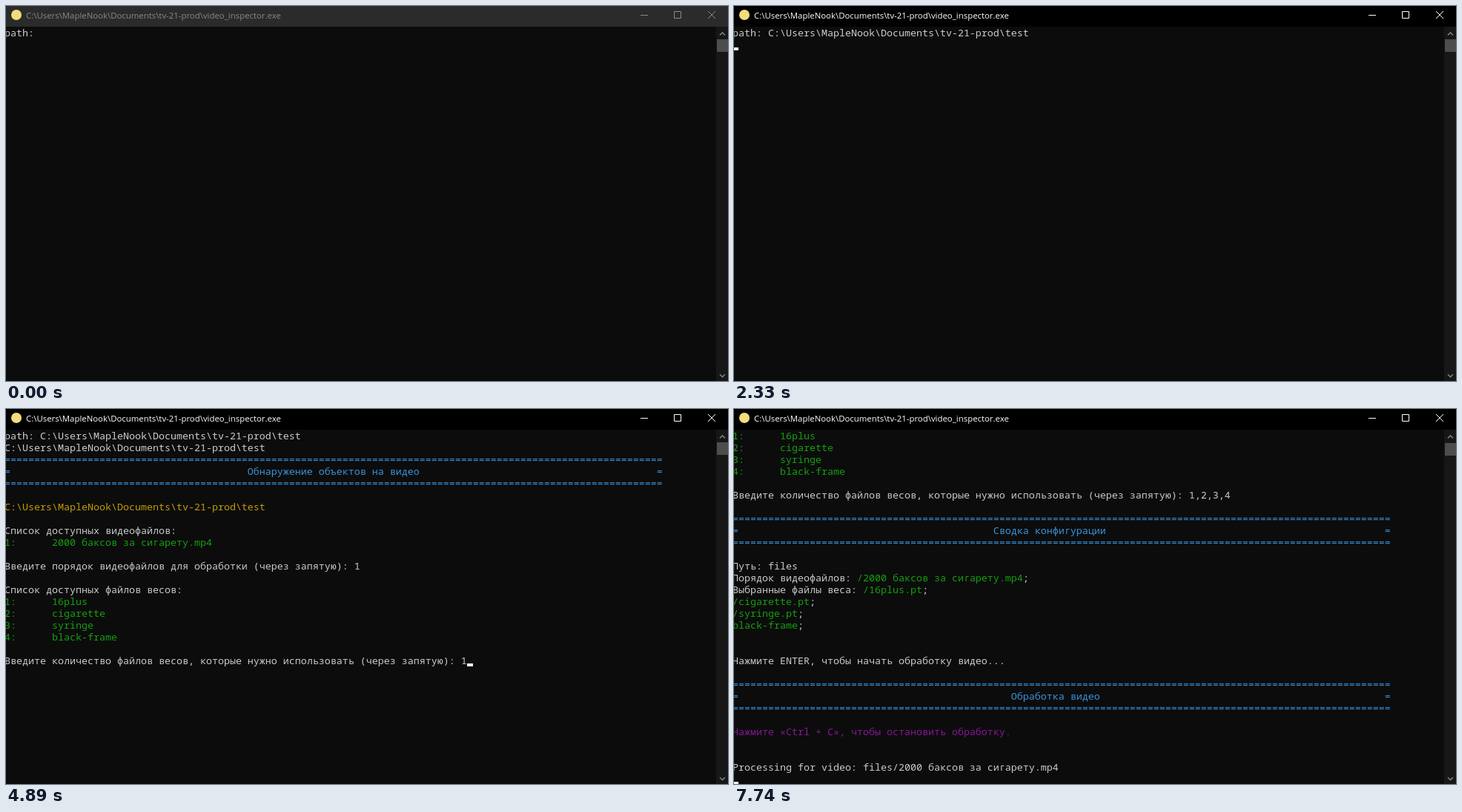
An HTML page that plays this animation: 974 px wide and 507 px high, repeating every 8000 ms.

```html
<!DOCTYPE html>
<html lang="ru">
<head>
<meta charset="utf-8">
<title>video_inspector</title>
<style>
  html, body { margin: 0; width: 974px; height: 507px; overflow: hidden; background: #0c0c0c; }
  body { position: relative; }
  #bar { position: absolute; inset: 0 0 auto; height: 28px; background: #2b2b2b; color: #8a8a8a; }
  #bar.active { background: #000; color: #fff; }
  #bar span { position: absolute; left: 27px; font: 11.4px/25px "Open Sans", sans-serif; white-space: pre; }
  #bar i { position: absolute; left: 7px; top: 5px; width: 14px; height: 14px; border-radius: 50%; background: #f3dc7c; }
  svg { position: absolute; left: 0; top: 0; }
  #screen { position: absolute; left: 0; top: 28px; width: 958px; height: 479px; overflow: hidden; }
  pre { position: absolute; left: -2px; top: 0; margin: 0; color: #ccc;
        font: 500 13.333px/16px "Noto Sans Mono", monospace; font-variant-ligatures: none; }
  #caret { position: absolute; width: 8px; height: 4px; background: #f2f2f2; }
  .b { color: #3a96dd } .y { color: #c19c00 } .g { color: #13a10e } .m { color: #881798 }
  #track { position: absolute; left: 958px; top: 28px; width: 16px; height: 479px; background: #171717; }
  #thumb { position: absolute; left: 1px; top: 17px; width: 15px; height: 17px; background: #4d4d4d; }
</style>
</head>
<body>
<div id="screen"><pre id="log"></pre><div id="caret"></div></div>
<div id="track">
  <div id="thumb"></div>
  <svg width="16" height="479" fill="none" stroke="#71827f" stroke-width="1.6">
    <path d="M5 11.5l3.5-3.5l3.5 3.5M5 470l3.5 3.5l3.5-3.5"/>
  </svg>
</div>
<div id="bar">
  <i></i><span id="title"></span>
  <svg width="974" height="28" fill="none" stroke="currentColor">
    <path d="M856 12.5h10M901.5 7.5h9v9h-9z"/><path d="M947 7l10 10M957 7l-10 10"/>
  </svg>
</div>
<svg id="mouse" width="14" height="20"><path fill="#fff" d="M0 0V15.5L3.4 12.4L5.8 17.5L7.9 16.6L5.6 11.6H10.4Z"/></svg>

<script>
const LOOP = 8000, ROWS = 30, CELL = 8, LINE = 16;
const $ = id => document.getElementById(id);
const paint = c => s => `<span class="${c}">${s}</span>`;
const blue = paint('b'), yellow = paint('y'), green = paint('g'), magenta = paint('m');

const root = 'C:\\Users\\MapleNook\\Documents\\tv-21-prod\\';
const dir = root + 'test';
const clip = '2000 баксов за сигарету.mp4';
const weights = ['16plus', 'cigarette', 'syringe', 'black-frame'];

const rule = '='.repeat(111);
const banner = (text, col) =>
  blue([rule, ('='.padEnd(col) + text).padEnd(110) + '=', rule].join('\n'));
const list = items => items.map((s, i) => green(`${i + 1}:      ${s}`)).join('\n');

// Console output: [time, appended text]
const output = [
  [0, 'path: '],
  [1390, dir],
  [2330, '\n'],
  [3240, [dir, banner('Обнаружение объектов на видео', 41), '', yellow(dir), '',
    'Список доступных видеофайлов:', list([clip]), '',
    'Введите порядок видеофайлов для обработки (через запятую): '].join('\n')],
  [4290, '1'],
  [4360, ['', '', 'Список доступных файлов весов:', list(weights), '',
    'Введите количество файлов весов, которые нужно использовать (через запятую): '].join('\n')],
  [4890, '1'], [5520, ','], [5870, '2'],
  [6010, ','], [6093, '3'], [6177, ','], [6260, '4'],
  [6720, ['', '', banner('Сводка конфигурации', 44), '', 'Путь: files',
    `Порядок видеофайлов: ${green('/' + clip)};`,
    `Выбранные файлы веса: ${green('/16plus.pt')};`,
    green('/cigarette.pt') + ';', green('/syringe.pt') + ';', green('black-frame') + ';',
    '', '', 'Нажмите ENTER, чтобы начать обработку видео...', ''].join('\n')],
  [7740, ['', banner('Обработка видео', 47), '',
    magenta('Нажмите «Ctrl + C», чтобы остановить обработку.'), '', '',
    'Processing for video: files/' + clip, ''].join('\n')],
];

const exitPath = [[222, 104], [291, 129], [381, 118], [470, 82], [547, 43]];
function pointer(t) {
  if (t < 350 || t >= 1800) return null;
  if (t >= 1600) return exitPath[Math.min(4, Math.floor((t - 1600) / 40))];
  const p = Math.min(1, Math.floor((t - 350) / 42.3) / 13);
  const left = (1 - p) ** 2;
  return [179 + 308 * left + 108 * left * left, 70 + 384 * left];
}

let shown = 0;
function drawLog(count) {
  if (count === shown) return;
  shown = count;
  $('log').innerHTML = output.slice(0, count).map(o => o[1]).join('');
  const lines = $('log').textContent.split('\n');
  const row = lines.length - 1;
  const scroll = Math.max(0, lines.length - ROWS);
  $('log').style.top = -scroll * LINE + 'px';
  $('caret').style.left = lines[row].length * CELL - 2 + 'px';
  $('caret').style.top = (row - scroll) * LINE + 12 + 'px';
}

function draw(t) {
  drawLog(output.filter(o => o[0] <= t).length);
  $('bar').className = t >= 970 ? 'active' : '';
  $('caret').hidden = t < 1250;
  $('thumb').style.top = (t >= 7740 ? 18 : 17) + 'px';
  const tip = pointer(t);
  $('mouse').style.visibility = tip ? 'visible' : 'hidden';
  if (tip) $('mouse').style.transform = `translate(${Math.round(tip[0])}px, ${Math.round(tip[1])}px)`;
}

$('title').textContent = root + 'video_inspector.exe';
const start = performance.now();
function tick() {
  draw((performance.now() - start) % LOOP);
  requestAnimationFrame(tick);
}
tick();
</script>
</body>
</html>
```
